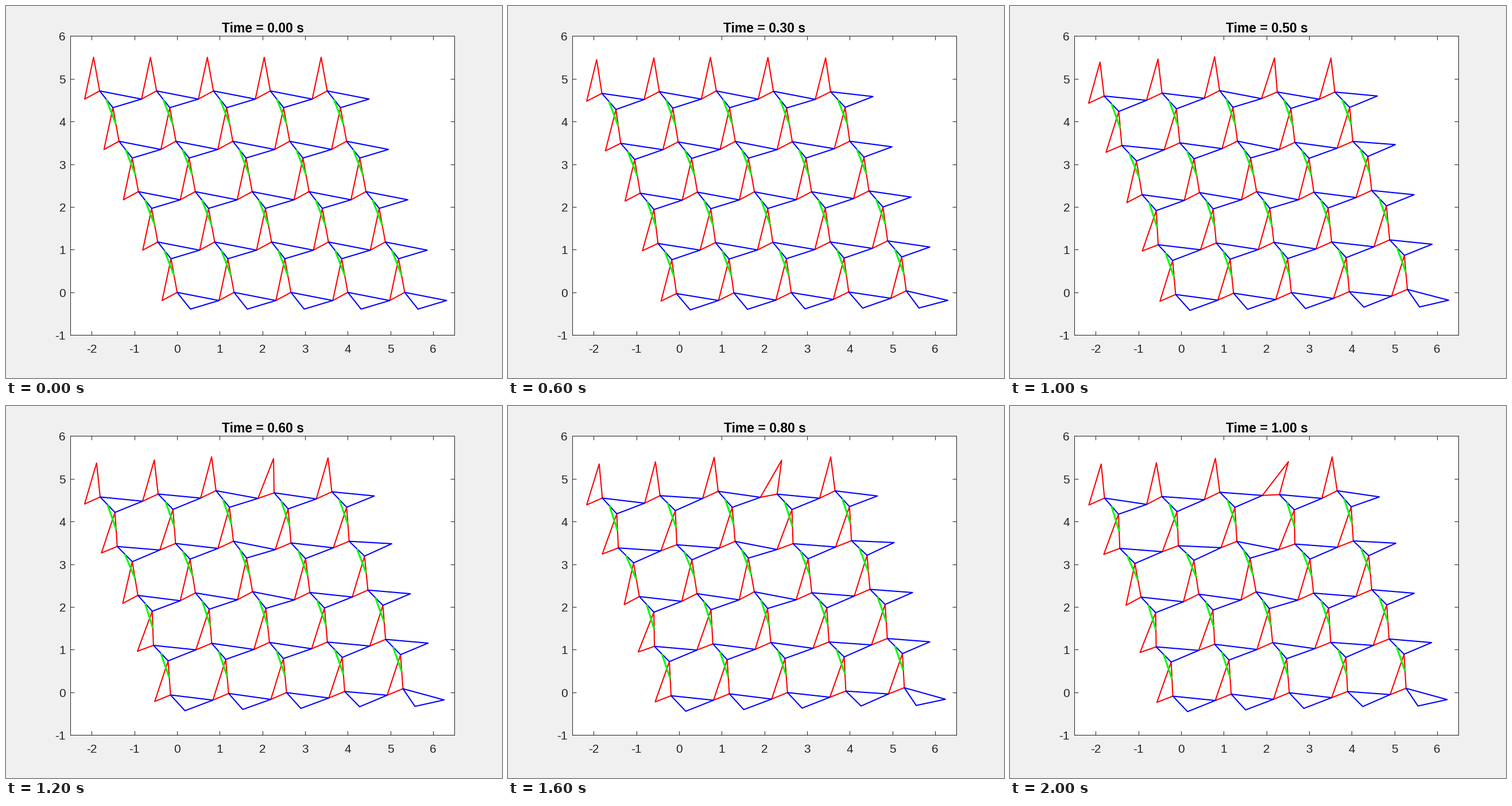
A matplotlib script that plays this animation: 864x648 px, repeating every 2.1 s.

```python
import numpy as np
import matplotlib.pyplot as plt
from matplotlib.animation import FuncAnimation
from matplotlib.collections import LineCollection, PolyCollection

W, H, DPI = 864, 648, 150
N = 5                    # triangles per row and rows in the lattice
FRAMES, STEP = 21, 0.05  # time shown per frame, in seconds
GREY = "#262626"

plt.rcParams["font.family"] = "Liberation Sans"

# Red triangle: |LR| = 0.4, |RT| = 0.8, |LT| = 1
# Blue triangle: |AC| = 0.5, |BC| = 0.7, |AB| = 1
LT_TURN = np.arccos(0.65)
AC_TURN = np.arccos(0.76)
RT_TURN = np.angle(np.exp(1j * LT_TURN) - 0.4)
REST_RED, REST_BLUE = 28.5, -11.0

# Swing of each top-row triangle: degrees, time of the peak, sharpness.
TOP_RED = [(-5, 0.83, 3.3), (-3.8, 0.58, 7), (-3.7, 0.78, 8),
           (-32.2, 1.4, 4.5), (-3.9, 0.57, 4)]
TOP_BLUE = [(5.4, 0.57, 4), (7.3, 0.85, 5), (9.8, 1.3, 12),
            (6.1, 0.92, 10), (5.7, 0.49, 2.3)]
# The right-hand column swings together, bottom row first.
SIDE_RED = [(swing, 0.86, 2.5) for swing in (-7.2, -6.6, -5.4, -7.0)]
SIDE_BLUE = [(swing, 0.8, 2.5) for swing in (-4.6, 6.6, 6.7, 8.5)]


def pulse(t, height, peak, sharp):
    """Smooth rise from rest to a peak, then a slower fall."""
    u = t / peak
    return height * u ** sharp * np.exp(sharp * (1 - u))


def angles(rest, swings, t):
    return np.radians([rest + pulse(t, *s) for s in swings])


def red_at(right, angle):
    left = right - 0.4 * np.exp(1j * angle)
    return left, right, left + np.exp(1j * (angle + LT_TURN))


def blue_at(a, angle):
    return a, a + np.exp(1j * angle), a + 0.5 * np.exp(1j * (angle - AC_TURN))


def hinge(tip, b):
    """Point 0.8 from tip and 1 from b, on the lower left side."""
    d = abs(b - tip)
    along = (0.8 ** 2 - 1 + d * d) / (2 * d)
    off = np.sqrt(max(0.8 ** 2 - along ** 2, 0))
    return tip + (b - tip) / d * (along - 1j * off)


def lattice(t):
    """Close the linkage from its top row and right column inward."""
    top_red, side_red = (angles(REST_RED, s, t) for s in (TOP_RED, SIDE_RED))
    top_blue, side_blue = (angles(REST_BLUE, s, t) for s in (TOP_BLUE, SIDE_BLUE))
    red, blue = {}, {}
    last = N - 1
    a = complex(-1.816 + 0.02 * t, 4.715 - pulse(t, 0.17, 0.9, 2.5))
    for i in range(N):
        if i:
            a = blue[i - 1, last][1] + 0.4 * np.exp(1j * top_red[i])
        red[i, last] = red_at(a, top_red[i])
        blue[i, last] = blue_at(a, top_blue[i])
    for j in reversed(range(last)):
        tip = blue[last, j + 1][2]
        a = tip - 0.8 * np.exp(1j * (side_red[j] + RT_TURN))
        red[last, j] = red_at(a, side_red[j])
        blue[last, j] = blue_at(a, side_blue[j])
        for i in reversed(range(last)):
            tip, b = blue[i, j + 1][2], red[i + 1, j][0]
            a = hinge(tip, b)
            red[i, j] = red_at(a, np.angle(tip - a) - RT_TURN)
            blue[i, j] = blue_at(a, np.angle(b - a))
    springs = [((blue[i, j + 1][0] + blue[i, j + 1][2]) / 2,
                (red[i, j][1] + red[i, j][2]) / 2)
               for i in range(N) for j in range(last)]
    return list(red.values()), list(blue.values()), springs


def points(shapes):
    z = np.array(shapes)
    return np.stack([z.real, z.imag], axis=-1)


fig = plt.figure(figsize=(W / DPI, H / DPI), dpi=DPI, facecolor="#f0f0f0")
LEFT, RIGHT, BOTTOM, TOP = 112.3, 781.3, H - 573.3, H - 52.3
UX, UY = (RIGHT - LEFT) / 9, (TOP - BOTTOM) / 7
ax = fig.add_axes([LEFT / W, BOTTOM / H, (RIGHT - LEFT) / W, (TOP - BOTTOM) / H])
ax.set(xlim=(-2.5, 6.5), ylim=(-1, 6), xticks=range(-2, 7), yticks=range(-1, 7))
ax.tick_params(direction="in", top=True, right=True, length=3.2, width=0.5,
               color=GREY, labelbottom=False, labelleft=False)
for spine in ax.spines.values():
    spine.set(color=GREY, linewidth=0.5)


def label(x, y, text, **style):
    return fig.text(x / W, y / H, text, va="baseline", **style)


for n in range(-2, 7):
    label(LEFT + (n + 2.5) * UX, 44.5, str(n), ha="center", size=10, color=GREY)
for n in range(-1, 7):
    label(104, BOTTOM + (n + 1) * UY - 8, str(n), ha="right", size=10, color=GREY)
title = label(447, 602.5, "", ha="center", size=11, weight="bold", color="black")


def outline(color):
    return ax.add_collection(PolyCollection(
        [], facecolors="none", edgecolors=color, linewidths=1, joinstyle="round"))


reds, blues = outline("#f00"), outline("#00f")
green = ax.add_collection(LineCollection([], colors="#0f0", linewidths=1.5))


def draw(frame):
    t = frame * STEP
    red, blue, springs = lattice(t)
    reds.set_verts(points(red))
    blues.set_verts(points(blue))
    green.set_segments(points(springs))
    title.set_text(f"Time = {t:.2f} s")
    return reds, blues, green, title


anim = FuncAnimation(fig, draw, frames=FRAMES, interval=100, repeat=True)
plt.show()
```
